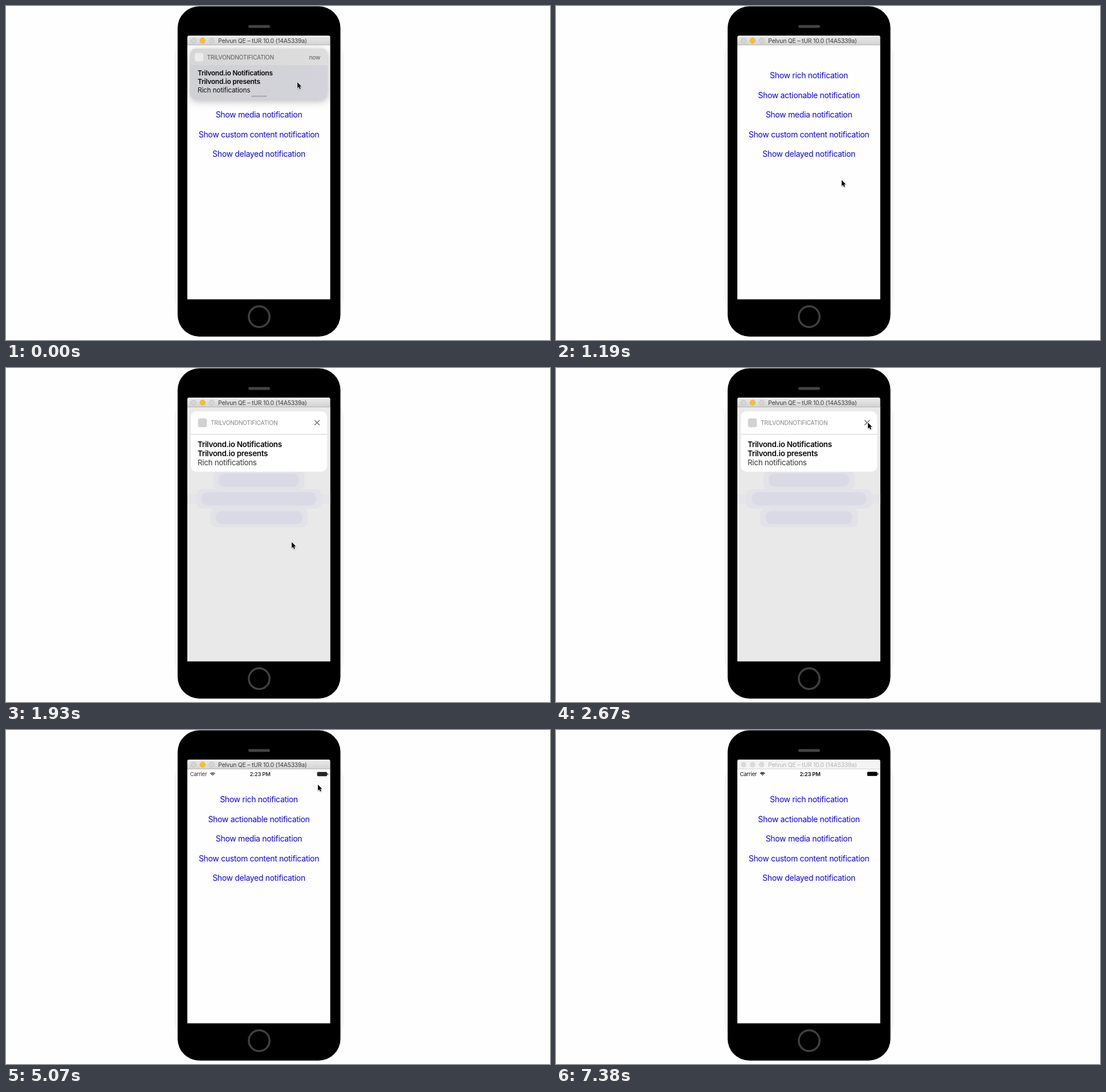
These frames come from a looping animation (954 px wide and 587 px high, 7.48 s). An HTML page with a canvas:

```html
<!DOCTYPE html>
<html lang="en">
<head>
<meta charset="utf-8">
<title>Rich notification demo</title>
<style>
  html, body { margin: 0; width: 100%; height: 100%; overflow: hidden; background: #fefefe; }
  canvas { display: block; }
</style>
</head>
<body>
<canvas id="stage" width="954" height="587"></canvas>
<script>
const ctx = document.getElementById('stage').getContext('2d');
const LOOP = 7480;
const DRAG = 600, BANNER_GONE = 1036, OPEN = 1340, SWIPE = 2080;
const CLOSE = 4770, LEAVE = 5510, INACTIVE = 7380;

const PAPER = '#fefefe';
const CENTER = 443.5;
const APP = 'Trilvond';
const DEVICE = 'Pelvun QE – tUR 10.0 (14A5339a)';
const LABELS = ['rich', 'actionable', 'media', 'custom content', 'delayed']
  .map(kind => `Show ${kind} notification`);
const LABEL_SIZE = 14;

const stepsSince = (start, t) => Math.floor((t - start + 8) / 148);
const lerp = (a, b, u) => a + (b - a) * u;
const easeOut = (u, power) => 1 - (1 - Math.min(u, 1)) ** power;

function cursorAt(t) {
  if (t < DRAG) return { x: 511, y: 134 };
  if (t < SWIPE) {
    const u = Math.min(1, 1.1 * stepsSince(DRAG, t) / 4);
    return { x: lerp(511, 501, u), y: lerp(135, 306, u) };
  }
  if (t < LEAVE) {
    const u = stepsSince(SWIPE, t) / 4;
    return { x: lerp(520, 547, easeOut(u, 1.4)), y: lerp(188, 96, easeOut(u, 2)) };
  }
  const n = stepsSince(LEAVE, t);
  return n < 2 ? { x: 865 + n, y: 435 + n } : null;
}

function box(x, y, w, h, r, fill) {
  ctx.beginPath();
  ctx.roundRect(x, y, w, h, r);
  ctx.fillStyle = fill;
  ctx.fill();
}

function setFont(size, weight = 400) {
  ctx.font = `${weight} ${size}px Inter, sans-serif`;
  ctx.letterSpacing = `${-0.022 * size}px`;
}

function text(str, x, y, size, color, weight = 400, align = 'left') {
  setFont(size, weight);
  ctx.textAlign = align;
  ctx.fillStyle = color;
  ctx.fillText(str, x, y);
}

function circle(x, y, r, fill, stroke, width = 1) {
  ctx.beginPath();
  ctx.arc(x, y, r, 0, Math.PI * 2);
  if (fill) { ctx.fillStyle = fill; ctx.fill(); }
  if (stroke) { ctx.strokeStyle = stroke; ctx.lineWidth = width; ctx.stroke(); }
}

function line(x1, y1, x2, y2, color, width) {
  ctx.beginPath();
  ctx.moveTo(x1, y1);
  ctx.lineTo(x2, y2);
  ctx.strokeStyle = color;
  ctx.lineWidth = width;
  ctx.stroke();
}

function gradient(x1, y1, x2, y2, from, to) {
  const g = ctx.createLinearGradient(x1, y1, x2, y2);
  g.addColorStop(0, from);
  g.addColorStop(1, to);
  return g;
}

function scaleAround(x, y, s) {
  ctx.translate(x, y);
  ctx.scale(s, s);
  ctx.translate(-x, -y);
}

function fillScreen(color) {
  box(318, 69, 250.6, 446.5, 0, color);
}

function phone() {
  box(295, 50, 298, 500, 40, '#f6f6f6');
  box(301, 0.5, 285.5, 580.5, 38, '#000');
  box(425, 33.5, 38, 5, 2.5, '#444');
  circle(444, 546, 18.2, null, '#404040', 3.5);
  fillScreen(PAPER);
}

function titleBar(active) {
  box(318, 52, 250.6, 17, [3, 3, 0, 0], active ? gradient(0, 52, 0, 69, '#ebebeb', '#d2d2d2') : '#f4f4f4');
  line(318, 68.5, 568.6, 68.5, active ? '#b4b4b4' : '#d4d4d4', 1);
  for (let i = 0; i < 3; i++) {
    const x = 329 + i * 15.8;
    if (!active) circle(x, 60.8, 4.8, '#dadada');
    else if (i === 1) circle(x, 60.8, 4.6, '#fdbd2c', '#dfa023', 0.6);
    else circle(x, 60.8, 4.4, '#d5d5d5', '#bdbdbd', 0.8);
  }
  text(DEVICE, 372, 64.6, 10.45, active ? '#404040' : '#b5b5b5');
}

function statusBar() {
  text('Carrier', 322.5, 80.6, 9.5, '#111');
  ctx.lineWidth = 1.4;
  ctx.strokeStyle = '#111';
  for (let r = 0.9; r < 6; r += 2.35) {
    ctx.beginPath();
    ctx.arc(362.2, 80.3, r, -Math.PI * 0.76, -Math.PI * 0.24);
    ctx.stroke();
  }
  text('2:23 PM', 445.5, 80.6, 9.4, '#111', 600, 'center');
  box(545.8, 73.4, 17.6, 7.4, 1.6, '#000');
  box(564, 75.6, 1.2, 3, 0.6, '#000');
}

// blurriness runs from 1 (just uncovered) to 0 (sharp).
function homeScreen(blurriness, hasStatus) {
  ctx.save();
  if (blurriness) ctx.filter = `blur(${1.25 * blurriness}px)`;
  scaleAround(CENTER, 292, 1 - 0.007 * blurriness);
  LABELS.forEach((label, i) => text(label, CENTER, 127 + i * 34.6, LABEL_SIZE, '#0d00f0', 400, 'center'));
  ctx.globalAlpha = 1 - 0.6 * blurriness;
  if (hasStatus) statusBar();
  ctx.restore();
}

function message(baseline, leading, size, bodyColor) {
  text(`${APP}.io Notifications`, 336, baseline, size, '#080808', 600);
  text(`${APP}.io presents`, 336, baseline + leading, size, '#080808', 600);
  text('Rich notifications', 336, baseline + 2 * leading, size, bodyColor);
}

function banner(drop) {
  ctx.save();
  ctx.translate(0, drop);
  ctx.shadowColor = 'rgba(0,0,0,0.28)';
  ctx.shadowBlur = 14;
  ctx.shadowOffsetY = 3;
  box(323.5, 75, 240, 89, 10, '#d2d2d6');
  ctx.shadowColor = 'transparent';
  box(323.5, 75, 240, 89, 10, gradient(324, 104, 563, 164, '#cfd0d3', '#d4d3dc'));
  box(323.5, 75, 240, 29, [10, 10, 0, 0], gradient(324, 0, 563, 0, '#d6d6d7', '#dedede'));
  box(331, 82.5, 15, 15, 3, '#ececec');
  text(APP.toUpperCase() + 'NOTIFICATION', 352.5, 93.7, 10.2, '#59595b');
  text('now', 551, 93.7, 10.2, '#59595b', 400, 'right');
  message(122, 15, 11.95, '#161616');
  box(430, 157.6, 27.5, 2.2, 1.1, '#a8a8ad');
  ctx.restore();
}

function blurredBackdrop() {
  fillScreen('#e9e9e9');
  box(318, 222, 250.6, 16, 0, '#e4e4e9');
  setFont(LABEL_SIZE);
  const smudge = (pad, height, color) => LABELS.slice(2).forEach((label, i) => {
    const w = ctx.measureText(label).width + pad;
    box(CENTER - w / 2, 197 + i * 33 - height / 2, w, height, 10, color);
  });
  smudge(8, 34, '#e2e2e8');
  smudge(-11, 23, '#dadae6');
}

function card(fill) {
  box(324, 76, 239.3, 106.3, 10, fill);
  box(336.7, 88.5, 15.6, 15.6, 3.5, '#d2d2d2');
  text(APP.toUpperCase() + 'NOTIFICATION', 359, 100, 10.2, '#858585');
  line(541.2, 91.7, 550, 100.5, '#757575', 1.6);
  line(550, 91.7, 541.2, 100.5, '#757575', 1.6);
  line(324, 116.6, 563.3, 116.6, '#d2d2d4', 1);
  message(138.7, 15.9, 13.4, '#3a3a3a');
}

function cursor({ x, y }) {
  ctx.save();
  ctx.translate(x, y);
  const arrow = new Path2D('M0 0V10.4L2.4 8.2 4 12 5.8 11.2 4.2 7.6 7.4 7.4Z');
  ctx.lineJoin = 'round';
  ctx.lineWidth = 1.6;
  ctx.strokeStyle = '#fff';
  ctx.shadowColor = 'rgba(0,0,0,0.3)';
  ctx.shadowBlur = 2;
  ctx.shadowOffsetY = 0.7;
  ctx.stroke(arrow);
  ctx.shadowColor = 'transparent';
  ctx.fillStyle = '#000';
  ctx.fill(arrow);
  ctx.restore();
}

function screen(t, pointer) {
  ctx.save();
  ctx.beginPath();
  ctx.rect(318, 69, 250.6, 446.5);
  ctx.clip();
  if (t < OPEN) {
    homeScreen(0, false);
    if (t < BANNER_GONE) banner(0.27 * Math.max(0, pointer.y - 135));
  } else if (t < CLOSE) {
    blurredBackdrop();
    scaleAround(CENTER, 129, 1 + 0.01 * 0.2 ** stepsSince(OPEN, t));
    card('#fff');
  } else {
    const n = stepsSince(CLOSE, t);
    if (n === 0) fillScreen('#fcfcfc');
    homeScreen(n < 3 ? 0.5 ** n : 0, true);
    if (n === 0) {
      ctx.translate(CENTER * 0.09, 391.6);
      ctx.scale(0.91, 0.91);
      card('#fcfcfc');
    }
  }
  ctx.restore();
}

function draw(t) {
  const pointer = cursorAt(t);
  ctx.fillStyle = PAPER;
  ctx.fillRect(0, 0, 954, 587);
  phone();
  titleBar(t < INACTIVE);
  screen(t, pointer);
  if (pointer) cursor(pointer);
}

const start = performance.now();
function tick() {
  draw((performance.now() - start) % LOOP);
  requestAnimationFrame(tick);
}
tick();
</script>
</body>
</html>
```
